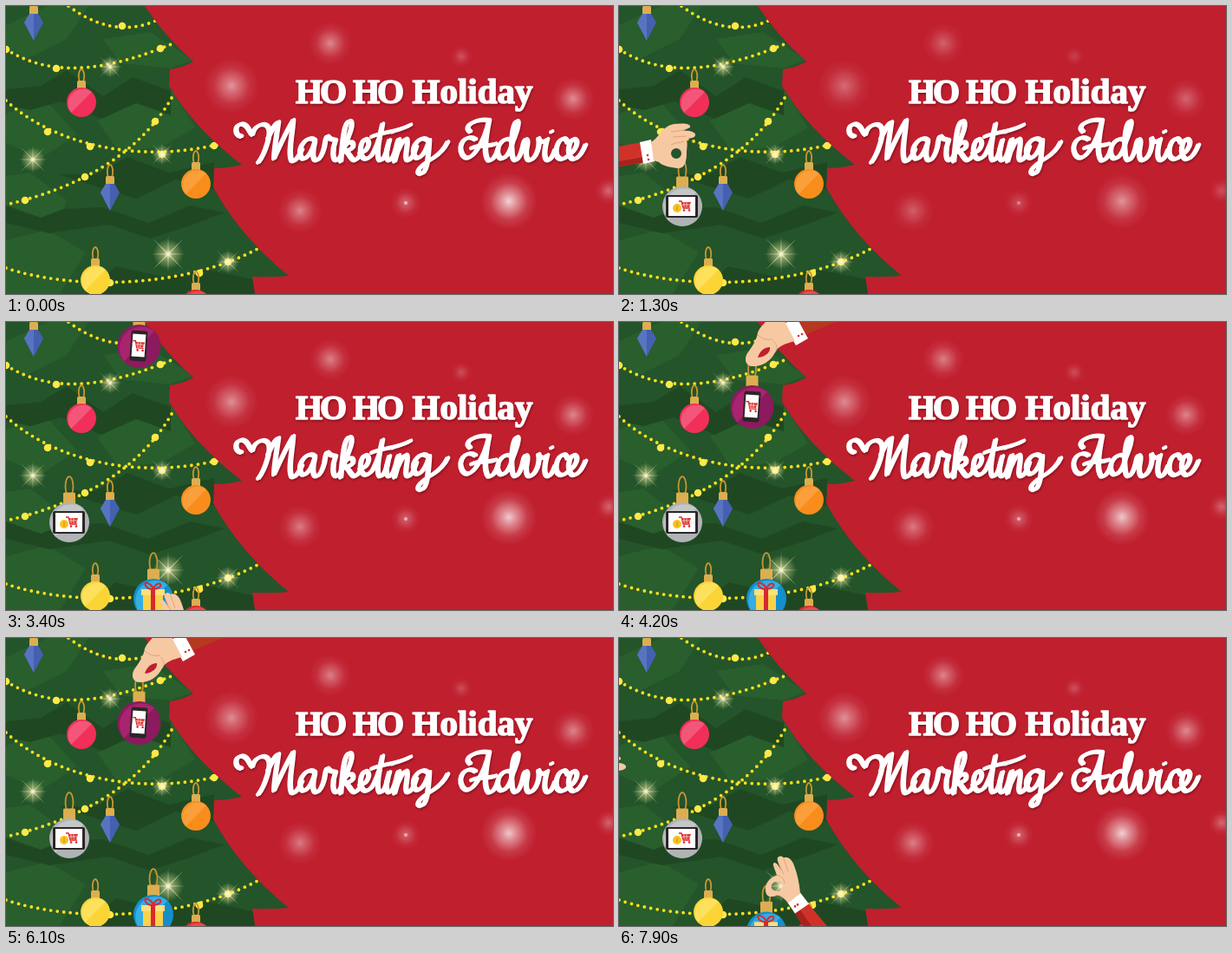
An HTML page that plays this animation: 700x332 px, repeating every 8 s.

```html
<!DOCTYPE html>
<html lang="en">
<head>
<meta charset="utf-8">
<title>Holiday banner</title>
<style>
html, body { margin: 0; width: 100%; height: 100%; overflow: hidden; background: #c01f2e; }
svg { display: block; }
.title { font: bold 41px "Liberation Serif", "Noto Serif", serif; fill: #fff; stroke: #fff; stroke-width: 1.6; stroke-linejoin: round; }
.script { fill: none; stroke: #fff; stroke-width: 4; stroke-linecap: round; stroke-linejoin: round; }
.shade { filter: drop-shadow(1px 2px 1px #7d101dbb); }
.string { fill: none; stroke: #ffe01b; stroke-width: 3.8; stroke-linecap: round; stroke-dasharray: 0 7.6; }
</style>
</head>
<body>
<svg width="700" height="332" viewBox="0 0 700 332">
  <defs>
    <radialGradient id="glow">
      <stop offset="0" stop-color="#fff" stop-opacity=".85"/>
      <stop offset=".25" stop-color="#fff" stop-opacity=".55"/>
      <stop offset=".65" stop-color="#fff" stop-opacity=".14"/>
      <stop offset="1" stop-color="#fff" stop-opacity="0"/>
    </radialGradient>
    <radialGradient id="spark">
      <stop offset="0" stop-color="#fffde0"/>
      <stop offset=".3" stop-color="#f4f0a8" stop-opacity=".5"/>
      <stop offset="1" stop-color="#e8e890" stop-opacity="0"/>
    </radialGradient>
    <clipPath id="tree">
      <path d="M0 0H160Q184 36 216 64Q204 71 189 73L188 92Q216 140 272 183Q256 187 240 187L239 209Q270 266 326 311Q305 313 284 312L287 332H0Z"/>
    </clipPath>
    <g id="cart">
      <path d="M-7 -5H-4L-2 3H6" fill="none" stroke="#d8232f" stroke-width="1.3"/>
      <path d="M-4 -4H7L5 2H-2Z" fill="#e0352f"/>
      <path d="M-1 -4V2M2 -4V2M-3 -1H6" stroke="#fff" stroke-width=".6"/>
      <circle cx="-1" cy="5.5" r="1.3" fill="#d8232f"/><circle cx="5" cy="5.5" r="1.3" fill="#d8232f"/>
    </g>
  </defs>
  <rect width="700" height="332" fill="#c01f2e"/>
  <g id="glows"></g>
  <g clip-path="url(#tree)">
    <rect width="330" height="332" fill="#24542a"/>
    <g fill="#295e2d">
      <path d="M0 22L48 0H95L70 38L22 62L0 48Z"/>
      <path d="M112 38L166 30L216 62L190 72L132 66Z"/>
      <path d="M0 124L45 108L82 148L40 176L0 158Z"/>
      <path d="M105 132L160 100L192 98L218 140L180 162L130 168Z"/>
      <path d="M0 196L28 192L70 224L58 262L0 248Z"/>
      <path d="M0 270L48 258L92 284L62 332H0Z"/>
    </g>
    <g fill="#1f4822">
      <path d="M0 96L40 92L70 74L112 104L146 82L190 98V126L150 112L110 130L64 110L28 120L0 114Z"/>
      <path d="M60 194L104 194L140 174L188 192L240 180V212L196 200L150 222L104 208Z"/>
      <path d="M0 230L40 244L66 234L112 232L164 250L212 230L252 238L216 252L166 268L118 252L50 262L0 250Z"/>
      <path d="M92 332L126 300L180 312L232 304L290 316V332Z"/>
    </g>
    <g id="strings"></g>
  </g>
  <g id="baubles"></g>
  <g id="stars"></g>

  <g class="shade">
    <g class="title">
      <text x="334" y="112" font-size="40" letter-spacing="-3">HO</text>
      <text x="400" y="112" font-size="40" letter-spacing="-3">HO</text>
      <text x="468.500" y="112">Holiday</text>
    </g>
    <g class="script" role="img" aria-label="Marketing Advice" transform="matrix(1 0 0 1.1 -1 -13)">
      <g id="lettering">
        <path d="M271 149C263 148 263 136 272 136C280 137 280 145 284 147C286 138 296 134 301 138C308 143 298 168 291 176M302 151C306 143 310 135 314 134C312 148 309 162 309 172C316 158 324 142 331 132C330 148 325 166 329 174C333 177 338 169 341 163"/>
        <path d="M356 153C348 147 338 158 339 167C340 177 350 173 356 155C353 166 353 174 358 174C362 173 365 167 367 160C368 154 369 148 371 149C374 153 378 152 380 153C376 162 376 174 381 174C385 173 388 166 390 160"/>
        <path d="M388 162C396 150 402 133 396 133C390 133 388 152 386 175M388 163C394 152 402 154 400 160C397 164 393 164 390 164C396 165 397 174 402 174C406 173 408 169 410 166"/>
        <path d="M408 166C416 166 421 156 416 152C410 151 407 162 410 169C413 176 421 172 425 163C430 154 433 142 434 136C430 150 426 172 431 174C435 174 438 168 440 160M422 149C434 144 450 145 466 137"/>
        <path d="M442 153C438 164 437 174 442 174C446 173 448 167 450 160C451 156 452 152 453 152C451 160 449 168 448 175C451 162 459 150 462 152C465 156 457 174 464 174C468 173 471 166 473 160"/>
        <path d="M486 153C478 147 468 158 470 167C472 176 482 172 488 153C487 168 486 190 477 188C471 186 480 178 492 172C500 167 506 161 509 155"/>
        <path d="M541 152C530 146 520 157 526 168C536 182 553 150 557 132C553 150 550 168 556 174C561 175 565 169 567 163M535 144C526 138 542 130 557 132M537 161C546 157 556 160 564 157"/>
        <path d="M584 154C576 147 565 158 567 167C569 177 580 172 584 155C588 146 593 133 589 133C583 134 580 174 587 174C592 173 595 164 597 155C599 150 602 152 601 158C599 166 599 174 604 174C611 172 616 160 614 151C615 156 620 155 623 153"/>
        <path d="M624 152C620 164 620 174 625 174C629 173 631 168 633 163M647 155C646 149 638 150 635 160C632 172 640 177 649 168C656 165 661 155 656 152C650 151 647 162 650 169C653 177 662 172 668 158"/>
        <path d="M446 144h.1M629 144h.1"/>
      </g>
      <use href="#lettering" x="2.400" y="-1"/>
    </g>
  </g>

  <g id="item0"></g>
  <g id="item1"></g>
  <g id="item2"></g>
  <g id="hand0">
    <path d="M-160 190L27 157L30 180L-160 214Z" fill="#d0322a"/>
    <path d="M-160 206L29 174L30 180L-160 214Z" fill="#a9211d"/>
    <path d="M24 157L37 154L41 179L28 182Z" fill="#fff"/>
    <circle cx="33" cy="172" r="1.3" fill="#d0322a"/><circle cx="34" cy="177" r="1.3" fill="#d0322a"/>
    <path fill="#f7c9a3" fill-rule="evenodd" d="M37 157C48 150 50 138 64 136C74 135 83 135 82 140L73 144C80 143 89 145 88 149C87 153 80 152 77 154C80 157 78 163 78 170C78 182 74 188 67 187C59 186 50 184 46 180L40 178Z M60 170a6 6 0 1 0 12 0a6 6 0 1 0-12 0Z"/>
    <path d="M60 145L76 143M62 151L78 150M60 160C65 157 71 158 75 156" fill="none" stroke="#dfa47d"/>
  </g>
  <g id="hand1">
    <path d="M201 295L217 285L320 410H275Z" fill="#d0322a"/>
    <path d="M201 295L207 291L290 410H275Z" fill="#a9211d"/>
    <path d="M194 285L209 274L219 287L203 298Z" fill="#fff"/>
    <circle cx="203" cy="290" r="1.3" fill="#d0322a"/><circle cx="206" cy="288" r="1.3" fill="#d0322a"/>
    <path fill="#f7c9a3" fill-rule="evenodd" d="M209 275C208 264 206 253 202 243C199 234 193 232 190 234C186 230 180 233 184 240L187 249C183 239 177 237 178 243L182 254C173 257 168 264 169 272C170 281 178 279 182 277C187 277 191 281 195 286Z M176 269a6 5 0 1 0 12-4a6 5 0 1 0-12 4Z"/>
    <path d="M190 235L195 250M184 240L190 253M182 254C188 255 191 259 191 264" fill="none" stroke="#dfa47d"/>
  </g>
  <g id="hand2">
    <path d="M205 -4L216 14L340 -36L330 -66Z" fill="#b5381f"/>
    <path d="M190 2L205 -5L218 19L204 27Z" fill="#fff"/>
    <circle cx="207" cy="16" r="1.3" fill="#d0322a"/><circle cx="211" cy="14" r="1.3" fill="#d0322a"/>
    <path fill="#f7c9a3" d="M192 1L203 22C192 25 184 27 180 35C175 46 163 52 153 51C146 50 144 43 148 36C154 28 159 20 160 12C163 4 172 -1 174 -8L190 -8Z"/>
    <path d="M160 41C162 34 167 29 174 29C175 34 170 40 160 41Z" fill="#c01f2e"/>
    <path d="M160 15C166 20 171 21 178 20M180 35C183 30 183 27 178 22" fill="none" stroke="#dfa47d"/>
  </g>
</svg>
<script>
const el = id => document.getElementById(id);
const draw = (id, parts) => { el(id).innerHTML = parts.join(''); };
const hanger = (x, y, k = 1) => `
  <ellipse cx="${x}" cy="${y - 14 * k}" rx="${3.2 * k}" ry="${8 * k}" fill="none" stroke="#c89632" stroke-width="1.8"/>
  <rect x="${x - 5 * k}" y="${y - 9 * k}" width="${10 * k}" height="${10 * k}" rx="1.5" fill="#dcae50"/>`;
const ball = (x, y, r, dark, light, k) => hanger(x, y - r + 1, k) + `
  <circle cx="${x}" cy="${y}" r="${r}" fill="${dark}"/>
  <path d="M${x - r * .7} ${y + r * .7}A${r} ${r} 0 0 1 ${x + r * .7} ${y - r * .7}Z" fill="${light}"/>`;
const drop = (x, y) => hanger(x, y) + `
  <path d="M${x - 5} ${y}H${x + 5}L${x + 11} ${y + 10}L${x} ${y + 31}L${x - 11} ${y + 10}Z" fill="#4560b0"/>
  <path d="M${x - 5} ${y}H${x}V${y + 31}L${x - 11} ${y + 10}Z" fill="#5874c0"/>`;
const star = ([x, y, r]) => {
  let d = '';
  for (let i = 0; i < 16; i++) {
    const a = i * Math.PI / 8, q = i % 2 ? r * .06 : i % 4 ? r : r * .85;
    d += `${i ? 'L' : 'M'}${x + q * Math.cos(a)} ${y + q * Math.sin(a)}`;
  }
  return `<circle cx="${x}" cy="${y}" r="${r * .7}" fill="url(#spark)"/><path d="${d}Z" fill="#f8f6d0" opacity=".7"/>`;
};

draw('glows', [[260, 92, 32, .62], [374, 43, 25, .55], [525, 58, 13, .28], [654, 107, 25, .58],
  [339, 236, 26, .52], [461, 227, 18, .4], [580, 225, 33, .95], [695, 213, 16, .4]]
  .map(([x, y, r, o]) => `<circle cx="${x}" cy="${y}" r="${r}" fill="url(#glow)" opacity="${o}"/>`)
  .concat('<circle cx="461" cy="227" r="2" fill="#fff" opacity=".55"/>'));

draw('strings', [
  'M72 0Q134 46 192 6', 'M0 50C58 86 125 74 214 34', 'M0 109C60 164 170 186 270 152',
  'M191 106C160 160 100 206 0 229', 'M0 302C70 326 200 328 290 280'
].map(d => `<path class="string" d="${d}"/>`).concat(
  [[134, 23], [58, 72], [178, 49], [0, 50], [48, 145], [97, 162], [240, 161], [172, 133],
   [91, 197], [22, 224], [120, 319], [223, 308], [180, 171], [256, 295]]
  .map(([x, y]) => `<circle cx="${x}" cy="${y}" r="4.3" fill="#ffe84a"/>`)));

draw('baubles', [drop(32, 9), drop(120, 205),
  ball(87, 111, 17, '#f22f59', '#f4567a'), ball(219, 205, 17, '#f98d1c', '#fa9f3a'),
  ball(103, 316, 17, '#fbd535', '#fde05c'), ball(219, 344, 17, '#dd2a2f', '#ee4a4a')]);
draw('stars', [[31, 177, 20], [120, 70, 17], [180, 171, 16], [187, 286, 25], [256, 295, 18]].map(star));

draw('item0', [ball(73, 231, 23, '#b1b3b6', '#c4c6c8', 1.4), `
  <rect x="54" y="218" width="37" height="26" rx="2" fill="#2b2527"/>
  <rect x="57" y="220" width="31" height="22" fill="#fff"/>
  <use href="#cart" x="76" y="230"/>
  <circle cx="67" cy="233" r="5" fill="#f9c31f"/><path d="M67 230V236" stroke="#c98a12"/>`]);
draw('item1', [ball(170, 319, 23, '#148fcb', '#35aee2', 1.4), `
  <rect x="158" y="313" width="23" height="19" fill="#fbd24a"/>
  <rect x="156" y="308" width="27" height="7" fill="#fde07a"/>
  <path d="M167 308h5v24h-5z" fill="#d8292f"/>
  <path d="M169 308C160 308 158 299 163 301C167 302 169 305 170 308C171 304 175 300 178 302C180 305 175 308 169 308Z" fill="none" stroke="#d8292f" stroke-width="2"/>`]);
draw('item2', [ball(153.5, 98, 25, '#8c1a5e', '#a8246f', 1.4), `
  <g transform="rotate(4 153 97)">
    <rect x="143.500" y="80" width="19" height="35" rx="2" fill="#2b2527"/>
    <rect x="145.500" y="84" width="15" height="26" fill="#fff"/>
    <use href="#cart" x="153" y="97"/>
  </g>`]);

// Each hand brings an ornament, waits, then goes back the way it came.
const speed = .125;
const trips = [
  { arrive: 1000, leave: 1760, dx: -1, dy: 0 },
  { arrive: 2555, leave: 2760, dx: 0, dy: 1 },
  { arrive: 3960, leave: 4500, dx: 0, dy: -1 }
];

function frame() {
  let t = Math.floor(performance.now() % 8000 / 100) * 100;
  if (t > 5100) t = 10300 - t;   // the second part runs backwards
  trips.forEach(({ arrive, leave, dx, dy }, i) => {
    const move = (id, d) => el(id + i).setAttribute('transform', `translate(${dx * d} ${dy * d})`);
    const coming = Math.max(0, arrive - t) * speed;
    move('item', coming);
    move('hand', coming + Math.max(0, t - leave) * speed);
  });
  const dim = (1 - Math.cos(t * Math.PI / 1300)) / 2 * (t < 2600 ? .35 : .08);
  el('glows').setAttribute('opacity', 1 - dim);
  requestAnimationFrame(frame);
}
frame();
</script>
</body>
</html>
```
